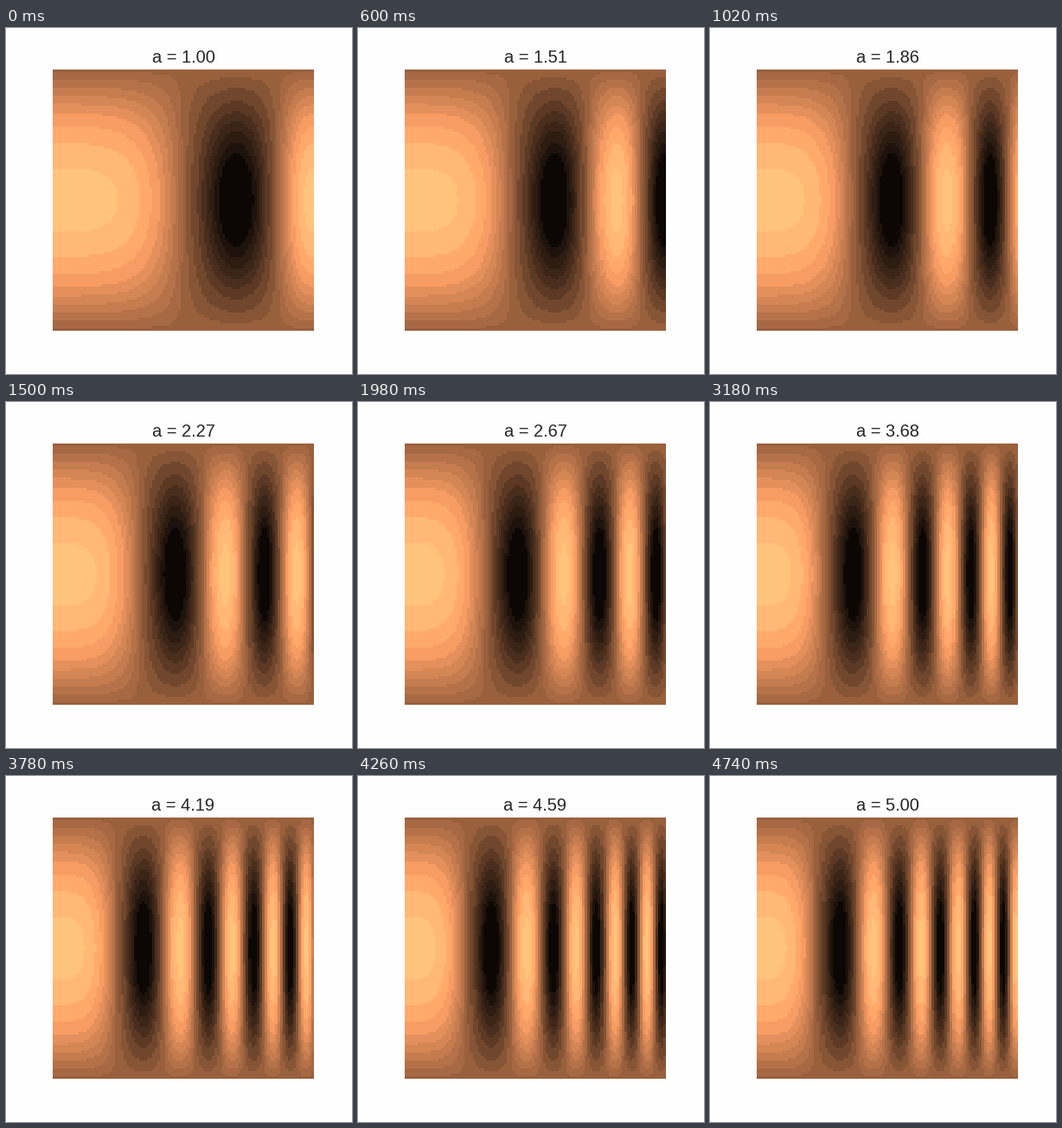
These frames come from a looping animation (400x400 px, 4800 ms). A matplotlib script:

```python
import numpy as np
import matplotlib.pyplot as plt
from matplotlib.animation import FuncAnimation
from matplotlib.colors import BoundaryNorm, ListedColormap

SIZE, DPI = 400, 100
FRAMES, INTERVAL = 80, 60
CELLS = 100

plt.rcParams["font.family"] = "Liberation Sans"

# Uneven bands of the copper scale, each filled with its middle tone
LEVELS = np.array([-1, -.84, -.76, -.67, -.58, -.48, -.36, -.21, -.08, .02,
                   .1, .2, .3, .4, .5, .63, .77, .925, 1.001])
middles = (LEVELS[:-1] + LEVELS[1:]) / 2
cmap = ListedColormap(plt.get_cmap("copper")((middles + 1) / 2))
norm = BoundaryNorm(LEVELS, cmap.N)

x = np.linspace(0, 2.51, CELLS)
y = np.linspace(0, np.pi, CELLS)
X, Y = np.meshgrid(x, y)
rates = np.linspace(1, 5, FRAMES)


def wave(a):
    return np.cos(a * X**2) * np.sin(Y)


fig = plt.figure(figsize=(SIZE / DPI, SIZE / DPI), dpi=DPI, facecolor="#fefefe")
ax = fig.add_axes([54 / SIZE, 50 / SIZE, 302 / SIZE, 302 / SIZE])
ax.axis("off")
image = ax.imshow(wave(rates[0]), cmap=cmap, norm=norm,
                  interpolation="nearest", aspect="auto")
title = ax.set_title("", fontsize=14.4, color="0.15", pad=6)


def update(i):
    image.set_data(wave(rates[i]))
    title.set_text(f"a = {rates[i]:.2f}")
    return image, title


anim = FuncAnimation(fig, update, frames=FRAMES, interval=INTERVAL,
                     repeat=True, repeat_delay=0)
plt.show()
```
